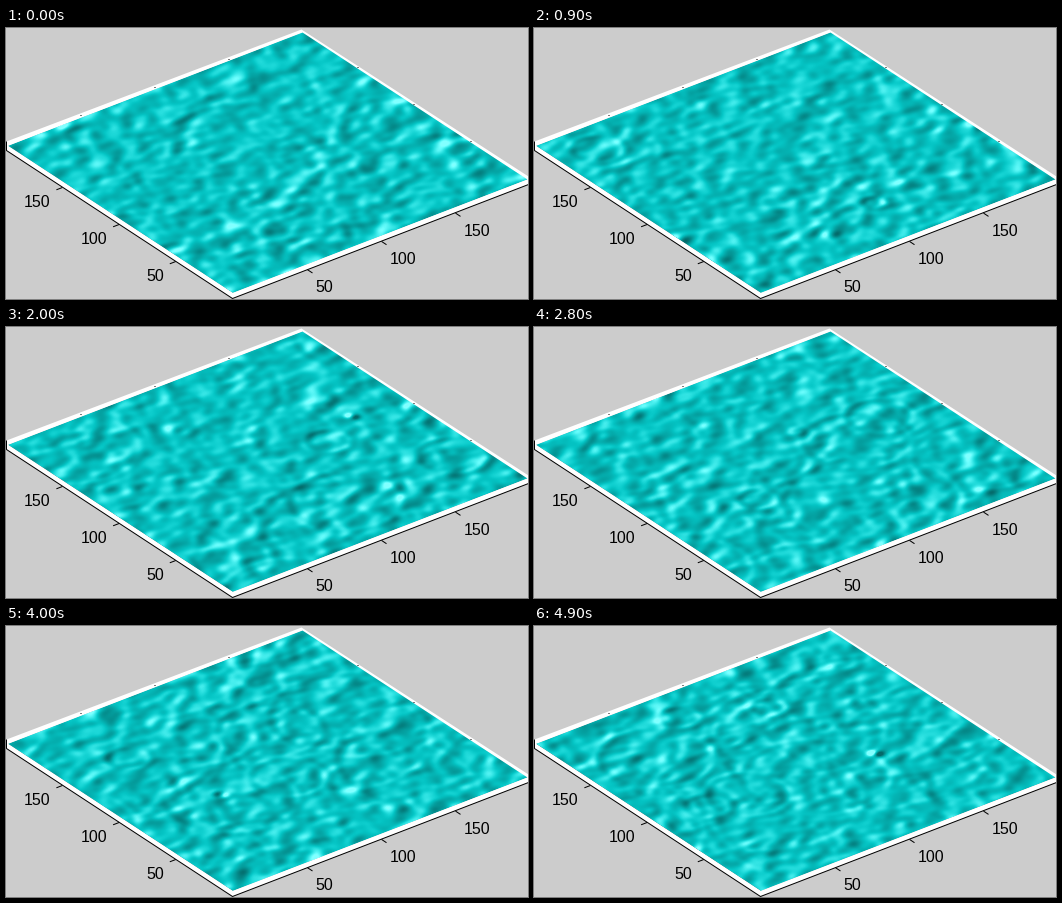
Recreate the animation shown at these times as a matplotlib script. Size 522x271 px, loop 5000 ms.

```python
import numpy as np
import matplotlib.pyplot as plt
from matplotlib.animation import FuncAnimation
from matplotlib.colors import ListedColormap
from matplotlib.patches import Polygon
from matplotlib.transforms import Affine2D

WIDTH, HEIGHT, DPI = 522, 271, 64
PX = 72 / DPI
FRAMES, INTERVAL = 50, 100
SIZE = 200
SPEED = 2.2           # wave travel in cells per frame
DROP_RADIUS = 2.3
DROP_STRENGTH = 5.5
LIGHT = np.array([-0.52, 0.85])
SHADE_LIMIT = 4

plt.rcParams["font.family"] = "Liberation Sans"
rng = np.random.default_rng(11)

# Water plane in stage pixels: front corner and its two edges
FRONT = np.array([226, 264.5])
EDGE_X = np.array([295, -113.5])
EDGE_Y = np.array([-225, -147])
TO_STAGE = np.column_stack([EDGE_X, EDGE_Y]) / SIZE

KX = 2 * np.pi * np.fft.rfftfreq(SIZE)[None, :]
KY = 2 * np.pi * np.fft.fftfreq(SIZE)[:, None]
K2 = KX**2 + KY**2
OMEGA = SPEED * np.sqrt(K2)
SLOPE = -1j * (LIGHT[0] * KX + LIGHT[1] * KY)


def drop_at(x, y, radius=DROP_RADIUS):
    """Spectrum of the lit slope of a round bump."""
    blob = radius**2 * np.exp(-K2 * radius**2 / 2)
    return SLOPE * blob * np.exp(-1j * (KX * x + KY * y))


def to_field(spectrum):
    return np.fft.irfft2(spectrum, (SIZE, SIZE))


def stage_to_water(px, py):
    return np.linalg.solve(TO_STAGE, np.array([px, py]) - FRONT)


# Older ripples, folded into two standing parts
swell_cos = np.zeros(K2.shape, complex)
swell_sin = np.zeros(K2.shape, complex)
for _ in range(320):
    age = rng.uniform(5, 130)
    spectrum = drop_at(*rng.uniform(0, SIZE, 2), rng.uniform(2.4, 4.6))
    swell_cos += spectrum * np.cos(OMEGA * age)
    swell_sin += spectrum * np.sin(OMEGA * age)
level = to_field(swell_cos).std()
swell_cos /= level
swell_sin /= level
drop_gain = DROP_STRENGTH / to_field(drop_at(100, 100)).max()

# Fresh drops: (birth in frames, stage x, stage y)
FALLS = [(19.7, 345, 90), (27.2, 262, 105), (34.7, 121, 133), (44.7, 234, 82),
         (43.4, 172, 181), (44.0, 145, 92), (48.7, 340, 128)]
drops = [(birth, drop_gain * drop_at(*stage_to_water(x, y))) for birth, x, y in FALLS]
for birth in (2.5, 6.1, 11.4, 14.6, 23.3, 30.7, 38.5):
    drops.append((birth, drop_gain * drop_at(*rng.uniform(15, SIZE - 15, 2))))


def water_shade(frame):
    spectrum = swell_cos * np.cos(OMEGA * frame) - swell_sin * np.sin(OMEGA * frame)
    for birth, drop in drops:
        if frame >= birth:
            spectrum = spectrum + drop * np.cos(OMEGA * (frame - birth))
    return to_field(spectrum)


def water_colormap():
    shade = np.linspace(-SHADE_LIMIT, SHADE_LIMIT, 256)
    cyan = np.clip(193 + 22 * shade, 105, 255)
    red = np.clip(4 + 23 * np.maximum(shade, 0) ** 1.5, 0, 130)
    return ListedColormap(np.stack([red, cyan, cyan], axis=-1) / 255)


fig = plt.figure(figsize=(WIDTH / DPI, HEIGHT / DPI), dpi=DPI, facecolor="#cccccc")
ax = fig.add_axes([0, 0, 1, 1])
ax.axis("off")

# White box around the water
box = [(0, 113), (295, 1), (522, 148), (522, 156), (226, 270), (0, 122)]
ax.fill(*zip(*box), color="white", lw=0, zorder=0)

plane = Affine2D(np.array([[*TO_STAGE[0], FRONT[0]],
                           [*TO_STAGE[1], FRONT[1]],
                           [0, 0, 1]]))
water = ax.imshow(water_shade(0), cmap=water_colormap(),
                  vmin=-SHADE_LIMIT, vmax=SHADE_LIMIT,
                  origin="lower", extent=(0, SIZE, 0, SIZE),
                  interpolation="bilinear", aspect="auto",
                  transform=plane + ax.transData, zorder=1)
corners = [FRONT, FRONT + EDGE_X, FRONT + EDGE_X + EDGE_Y, FRONT + EDGE_Y]
water.set_clip_path(Polygon(corners, transform=ax.transData))


def line(points):
    ax.plot(*zip(*points), color="black", lw=PX, zorder=2, solid_capstyle="butt")


line([(0, 113), (0, 122), (226, 270), (522, 156)])

for i in (1, 2, 3):
    label = str(50 * i)
    x, y = 227 + 74 * i, 269.5 - 28.3 * i
    line([(x, y), (x + 5, y + 3.3)])
    ax.text(x + 8, y + 16.5, label, fontsize=16 * PX, ha="left", va="center_baseline")
    x, y = 226 - 56.7 * i, 270 - 37 * i
    line([(x, y), (x - 6, y + 2.3)])
    ax.text(x - 12, y + 13.5, label, fontsize=16 * PX, ha="right", va="center_baseline")
    for x, y in ((74 * i, 114 - 28 * i), (294 + 56.5 * i, 1 + 37 * i)):
        line([(x - 0.5, y), (x + 0.5, y)])

ax.set_xlim(-0.5, WIDTH - 0.5)
ax.set_ylim(HEIGHT - 0.5, -0.5)


def update(frame):
    water.set_data(water_shade(frame))
    return [water]


animation = FuncAnimation(fig, update, frames=FRAMES, interval=INTERVAL,
                          repeat=True, repeat_delay=0, blit=False)
plt.show()
```
